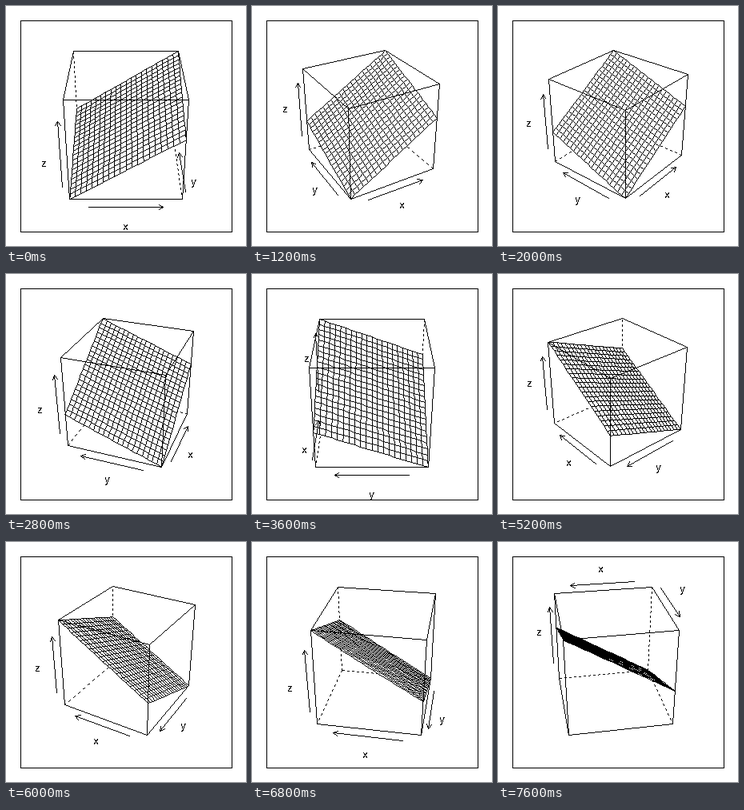
Animation, 300 px wide and 300 px high, one loop 8 s. Source, as a matplotlib script:

```python
import itertools

import matplotlib.pyplot as plt
import numpy as np
from matplotlib.animation import FuncAnimation

SIZE, DPI = 300, 100
FRAMES, INTERVAL, STEP = 20, 400, 10
TILT = np.radians(30)
EYE, ZOOM, PANEL = 10, 0.8, 264 / 1.14
CELLS = 20
SLOPE_X, SLOPE_Y = 0.625, 0.375
ARROW_OFFSET, ARROW_HALF, LABEL_OFFSET = 1.1, 0.66, 1.335
DASH = 3

CORNERS = np.array(list(itertools.product((-1, 1), repeat=3)), float)
EDGES = [(i, j) for i, j in itertools.combinations(range(8), 2)
         if np.abs(CORNERS[i] - CORNERS[j]).sum() == 2]

ticks = np.linspace(-1, 1, CELLS + 1)
gx, gy = np.meshgrid(ticks, ticks)
GRID = np.stack([gx, gy, SLOPE_X * gx + SLOPE_Y * gy], axis=-1)


def rotate(points, theta):
    """Return horizontal, vertical and toward-the-viewer coordinates."""
    x, y, z = np.moveaxis(np.asarray(points, float), -1, 0)
    across = np.cos(theta) * x - np.sin(theta) * y
    back = np.sin(theta) * x + np.cos(theta) * y
    up = np.cos(TILT) * z + np.sin(TILT) * back
    near = np.sin(TILT) * z - np.cos(TILT) * back
    return across, up, near


def perspective(points, theta):
    across, up, near = rotate(points, theta)
    return np.stack([across, up], axis=-1) / (EYE - near)[..., None]


def make_projector(theta):
    """The view is fitted to the box's bounds, then zoomed about the origin."""
    box = perspective(CORNERS, theta)
    low, high = box.min(axis=0), box.max(axis=0)
    scale = PANEL / (high - low).max()
    centre = (low + high) / 2

    def project(points):
        flat = (ZOOM * perspective(points, theta) - centre) * scale
        return SIZE / 2 + flat * [1, -1]
    return project


def axis_edges(degrees):
    """Middle of the box edge that carries each axis arrow."""
    if degrees == 0:
        return (0, -1, -1), (1, 0, -1), (-1, -1, 0)
    if degrees < 90:
        return (0, -1, -1), (-1, 0, -1), (-1, 1, 0)
    if degrees <= 180:
        return (0, 1, -1), (-1, 0, -1), (1, 1, 0)
    return (0, -1, 1), (-1, 0, 1), (1, -1, 0)


def line(canvas, start, end, dashed=False):
    """Draw a hard one-pixel line."""
    start, end = np.floor(start), np.floor(end)
    steps = int(np.abs(end - start).max())
    along = np.arange(steps + 1)
    t = along[:, None] / max(steps, 1)
    cols, rows = np.floor(start + (end - start) * t + 0.5).astype(int).T
    if dashed:
        shown = along // DASH % 2 == 0
        cols, rows = cols[shown], rows[shown]
    canvas[rows, cols] = 0


def fill_white(canvas, polygon):
    """Clear the inside of a convex polygon."""
    rows, cols = np.mgrid[:SIZE, :SIZE]
    sides = []
    for (x0, y0), (x1, y1) in zip(polygon, np.roll(polygon, -1, axis=0)):
        sides.append((x1 - x0) * (rows - y0) - (y1 - y0) * (cols - x0))
    sides = np.array(sides)
    canvas[(sides >= 0).all(axis=0) | (sides <= 0).all(axis=0)] = 1


def draw_frame(canvas):
    for a, b in itertools.product((18, 282), repeat=2):
        line(canvas, np.array([18, 18]), np.array([a, b]) if a != b else [18, 18])
        line(canvas, np.array([282, 282]), np.array([a, b]) if a != b else [282, 282])


def draw_surface(canvas, project):
    points = project(GRID)
    fill_white(canvas, np.floor(points[[0, 0, -1, -1], [0, -1, -1, 0]]))
    for lattice in (points, points.swapaxes(0, 1)):
        for row in lattice:
            for start, end in zip(row, row[1:]):
                line(canvas, start, end)


def draw_arrow(canvas, start, tip):
    line(canvas, start, tip)
    heading = np.arctan2(*(start - tip)[::-1])
    for a in (heading - np.pi / 6, heading + np.pi / 6):
        line(canvas, tip + 6.2 * np.array([np.cos(a), np.sin(a)]), tip)


def draw_axes(canvas, project, degrees):
    for k, middle in enumerate(axis_edges(degrees)):
        middle = np.array(middle, float)
        half = ARROW_HALF * np.eye(3)[k]
        ends = project(middle * ARROW_OFFSET + np.array([-half, half]))
        draw_arrow(canvas, *ends)
        x, y = project(middle * LABEL_OFFSET)
        labels[k].set_position((x - 0.3, y + 4.4))


fig = plt.figure(figsize=(SIZE / DPI, SIZE / DPI), dpi=DPI, facecolor="white")
ax = fig.add_axes([0, 0, 1, 1])
ax.axis("off")
image = ax.imshow(np.ones((SIZE, SIZE)), cmap="gray", vmin=0, vmax=1,
                  extent=(0, SIZE, SIZE, 0), interpolation="nearest")
labels = [ax.text(0, 0, name, ha="center", va="baseline", antialiased=False,
                  family="DejaVu Sans", fontsize=12 * 72 / DPI)
          for name in "xyz"]


def draw(frame):
    degrees = frame * STEP
    theta = np.radians(degrees)
    project = make_projector(theta)
    canvas = np.ones((SIZE, SIZE))
    draw_frame(canvas)

    near = rotate(CORNERS, theta)[2]
    farthest = near < near.min() + 1e-9
    points = project(CORNERS)
    hidden = [e for e in EDGES if farthest[list(e)].any()]
    for i, j in hidden:
        line(canvas, points[i], points[j], dashed=True)
    draw_surface(canvas, project)
    for i, j in EDGES:
        if (i, j) not in hidden:
            line(canvas, points[i], points[j])
    draw_axes(canvas, project, degrees)
    image.set_data(canvas)
    return [image, *labels]


anim = FuncAnimation(fig, draw, frames=FRAMES, interval=INTERVAL,
                     init_func=lambda: [image, *labels],
                     repeat=True, repeat_delay=0)
plt.show()
```
